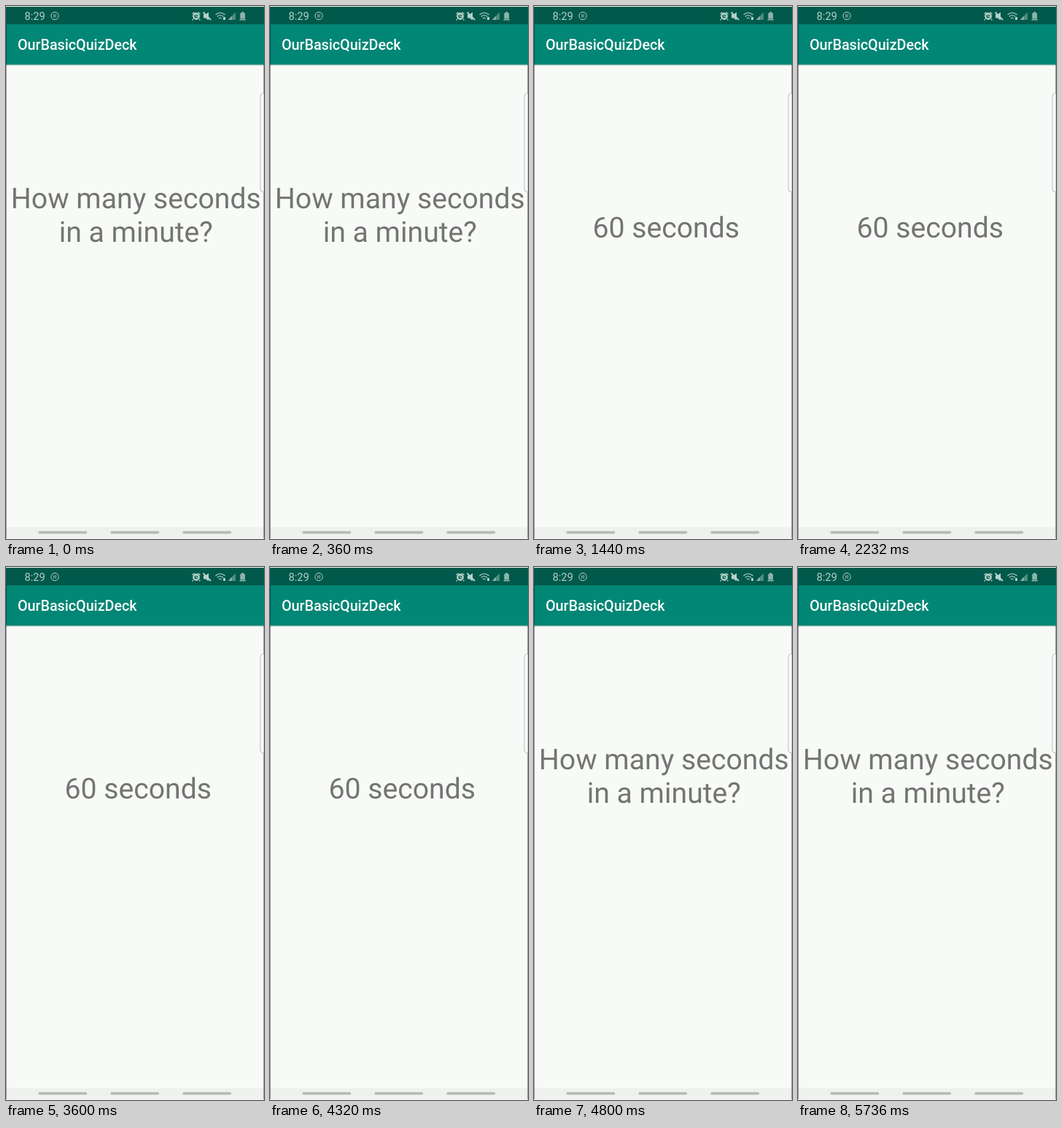
These frames come from a looping animation (354 px wide and 730 px high, 6.36 s). An HTML page:

```html
<!DOCTYPE html>
<html lang="en">
<head>
<meta charset="utf-8">
<title>Flashcard</title>
<style>
  html, body { margin: 0; width: 100%; height: 100%; overflow: hidden; background: #f8faf7; }
  svg { display: block; width: 354px; height: 730px; font-family: Roboto, sans-serif; }
  .card { font-size: 39.2px; fill: #737573; text-anchor: middle; text-rendering: geometricPrecision; }
  .icons { fill: none; stroke: #b4d2c9; stroke-width: 1.2; }
  .icons .solid { fill: #b4d2c9; stroke: none; }
  .icons .soft { fill: #8db5aa; stroke: none; }
  .icons .dim { fill: #4f8c80; stroke: none; }
</style>
</head>
<body>
<svg viewBox="0 0 354 730">
  <defs>
    <linearGradient id="shadow" x2="0" y2="1">
      <stop stop-color="#5f9c90"/>
      <stop offset="1" stop-color="#f8faf7"/>
    </linearGradient>
  </defs>
  <rect width="354" height="730" fill="#f8faf7"/>
  <rect y="1" width="354" height="24" fill="#00594a"/>
  <rect y="25" width="354" height="55" fill="#028675"/>
  <rect y="80" width="354" height="2" fill="url(#shadow)"/>
  <rect y="714" width="354" height="15" fill="#eff1ee"/>
  <path d="M.5 25V729M353.5 80V729" stroke="#000" stroke-opacity=".33"/>
  <path d="M46 721H109.500M145 721H208.500M244 721H307.500" stroke="#b7b9b6" stroke-width="3.600" stroke-linecap="round"/>

  <text x="25.500" y="18.800" font-size="14.600" fill="#b4d2c9">8:29</text>
  <g class="icons">
    <circle cx="67" cy="13.500" r="5.200" stroke-width="1"/>
    <path d="M65.800 11.300v4.400M68.200 11.300v4.400" stroke-width="1"/>
    <circle cx="261" cy="14" r="3.700" stroke-width="2.400"/>
    <path d="M255.500 11l3-2.500M266.500 11l-3-2.500M261 11.500v3h2M257 18l-1.500 1.500M265 18l1.500 1.500"/>
    <path class="solid" d="M271 11.500h3l4-3v11l-4-3h-3z"/>
    <path d="M270.500 8.500l10.500 10.500" stroke-width="1.800"/>
    <path d="M287.500 12q6.500-5.500 13 0M289.800 14.500q4.200-3.500 8.400 0M292 17q2-1.500 4 0"/>
    <path class="solid" d="M298 19v-3l1.500-1.500 1.500 1.500v3z"/>
    <path class="dim" d="M305 19l10-10.500V19z"/>
    <path class="soft" d="M305 19l5-5.200V19z"/>
    <path class="soft" d="M323.300 8h2.700v1.500h2V17.500h-6.700V9.500h2zM320.500 18h8.300v1.500h-8.300z"/>
  </g>
  <text x="16" y="60" font-size="19.700" font-weight="500" fill="#fff">OurBasicQuizDeck</text>

  <g id="question" class="card">
    <text x="178.300" y="277">How many seconds</text>
    <text x="178.300" y="322.800">in a minute?</text>
  </g>
  <text id="answer" class="card" x="181.300" y="316.500">60 seconds</text>
  <path d="M355 119.500h-2q-4 0-4 4.500V250q0 4.500 4 4.500h2" fill="#fff" fill-opacity=".5" stroke="#babdba"/>
</svg>
<script>
  const LOOP = 6360;
  const answerTimes = [[1440, 2760], [3600, 4800]];
  const question = document.getElementById('question');
  const answer = document.getElementById('answer');

  function draw() {
    const t = performance.now() % LOOP;
    const flipped = answerTimes.some(([from, to]) => t >= from && t < to);
    question.style.display = flipped ? 'none' : '';
    answer.style.display = flipped ? '' : 'none';
    requestAnimationFrame(draw);
  }
  draw();
</script>
</body>
</html>
```
